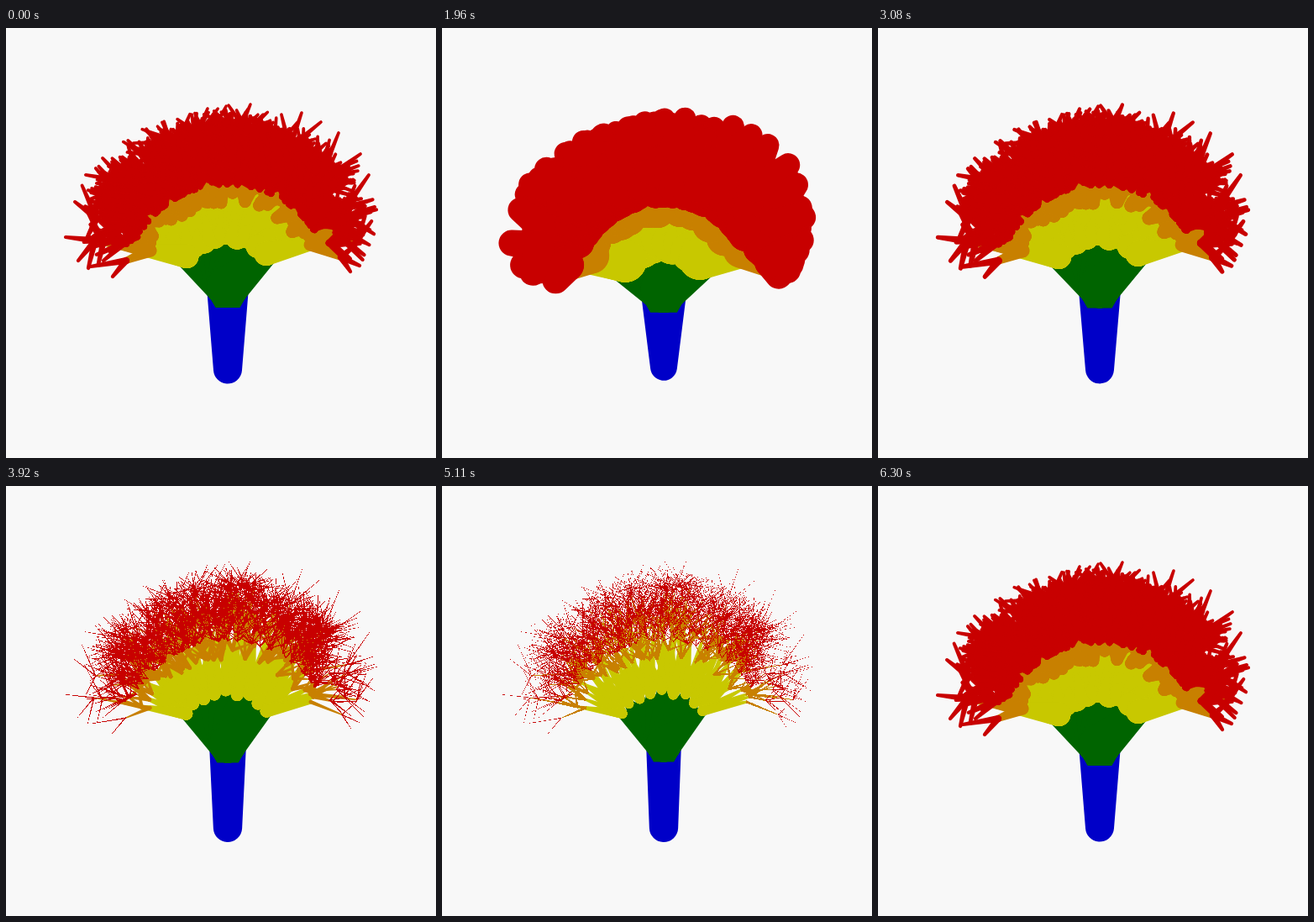
An HTML page with a canvas for the animation above (6370 ms loop, 512 px wide and 512 px high).

```html
<!DOCTYPE html>
<html lang="en">
<head>
<meta charset="utf-8">
<title>Branching tree</title>
<style>
  html, body { margin: 0; width: 100%; height: 100%; overflow: hidden; background: #f8f8f8; }
  canvas { display: block; width: 512px; height: 512px; }
</style>
</head>
<body>
<canvas id="stage" width="512" height="512"></canvas>
<script>
const ctx = document.getElementById('stage').getContext('2d');
const STEP = 70, STEPS = 91;
const COLORS = ['#0000c8', '#006400', '#c8c800', '#c88000', '#c80000'];
const FORK = { x: 264, y: 308 };
const PIVOT = { x: 264, y: 363 };

let seed = 20417;
function rnd() {
  seed = (seed * 1664525 + 1013904223) >>> 0;
  return seed / 4294967296;
}
const spread = deg => (rnd() + rnd() - 1) * deg;

// a: degrees away from straight up, r: distance from the fork
function polar(a, r) {
  const t = a * Math.PI / 180;
  return { x: FORK.x + r * Math.sin(t), y: FORK.y + 2 - r * Math.cos(t), a, r };
}

const levels = [[], [], [], [], []];
function grow(level, from, to) {
  levels[level].push({ from, to });
  return to;
}

// Radius of the crown, smaller towards the sides
const crown = a => 217 - 2 * Math.max(0, Math.abs(a) - 55);

function tipAt(node) {
  const a = Math.max(-80, Math.min(78, node.a + spread(17)));
  const r = Math.min(crown(a) - 26 * rnd(), node.r + 8 + 42 * rnd());
  return polar(a, r);
}

function orangeAt(node) {
  const a = node.a * 1.03 + spread(15);
  const r = Math.max(124, node.r + 4 + 46 * rnd());
  return polar(a, Math.min(r, crown(a) - 22));
}

function buildTree() {
  grow(0, { x: 264, y: 406.5 }, FORK);
  for (let i = 0; i < 9; i++) {
    const green = grow(1, FORK, polar(-52 + 100 * i / 8, 61 + 7 * rnd()));
    for (let j = 0; j < 8; j++) {
      const a = green.a * 0.95 + ((j + rnd()) / 8 * 2 - 1) * 17;
      const yellow = grow(2, green, polar(a, 102 + 46 * rnd() * Math.cos(a * Math.PI / 180)));
      for (let k = 0; k < 5; k++) {
        const orange = grow(3, yellow, orangeAt(yellow));
        for (let m = 0; m < 4; m++) grow(4, orange, tipAt(orange));
      }
    }
  }
  addRim();
  addSideBranches();
}

// Long tips that shape the outline
function addRim() {
  const rim = [[265, 92], [291, 91], [240, 96], [352, 101], [375, 112], [396, 125],
    [422, 150], [432, 175], [439, 213], [95, 175], [82, 207], [115, 155]];
  const nodes = levels[3].map(s => s.to);
  for (const [x, y] of rim) {
    const miss = n => Math.abs(Math.hypot(n.x - x, n.y - y) - 38);
    const near = nodes.reduce((p, q) => miss(q) < miss(p) ? q : p);
    grow(4, near, { x, y });
  }
}

// Low boughs on both sides: yellow end, orange end, tips
function addSideBranches() {
  const sides = [
    [[172, 265], [143, 277], [127, 296], [101, 284]],
    [[172, 265], [106, 253], [71, 249], [86, 277], [98, 286]],
    [[362, 258], [399, 273], [410, 290], [421, 283], [416, 258]]
  ];
  const pt = ([x, y]) => ({ x, y });
  for (const [yellow, orange, ...tips] of sides) {
    const left = yellow[0] < FORK.x;
    const start = levels[1][left ? 0 : 8].to;
    const y = grow(2, start, pt(yellow));
    const o = grow(3, y, pt(orange));
    for (const t of tips) grow(4, o, pt(t));
  }
}

function capsule(x0, y0, r0, x1, y1, r1) {
  const d = Math.hypot(x1 - x0, y1 - y0);
  ctx.beginPath();
  if (d <= Math.abs(r0 - r1)) {
    if (r0 > r1) ctx.arc(x0, y0, r0, 0, 2 * Math.PI);
    else ctx.arc(x1, y1, r1, 0, 2 * Math.PI);
  } else {
    const t = Math.atan2(y1 - y0, x1 - x0);
    const e = Math.acos((r0 - r1) / d);
    ctx.arc(x0, y0, r0, t + e, t - e + 2 * Math.PI);
    ctx.arc(x1, y1, r1, t - e, t + e);
    ctx.closePath();
  }
  ctx.fill();
}

// Hairlines only fill the pixels whose centre they cover
function hairline(x0, y0, r0, x1, y1, r1) {
  const dx = x1 - x0, dy = y1 - y0;
  const wide = Math.abs(dx) > Math.abs(dy);
  const n = Math.max(1, Math.ceil(Math.max(Math.abs(dx), Math.abs(dy))));
  const stretch = Math.hypot(dx, dy) / (Math.max(Math.abs(dx), Math.abs(dy)) || 1);
  const [m0, m1, c0, c1] = wide ? [x0, x1, y0, y1] : [y0, y1, x0, x1];
  for (let i = 0; i < n; i++) {
    const main = Math.floor(m0 + (m1 - m0) * i / n);
    const u = (main + 0.5 - m0) / ((m1 - m0) || 1);
    const c = c0 + (c1 - c0) * u;
    const half = (r0 + (r1 - r0) * u) * stretch;
    const lo = Math.ceil(c - half - 0.5), hi = Math.floor(c + half - 0.5);
    if (hi < lo) continue;
    if (wide) ctx.fillRect(main, lo, 1, hi - lo + 1);
    else ctx.fillRect(lo, main, hi - lo + 1, 1);
  }
}

function hexagon(x, y, r) {
  ctx.beginPath();
  for (let i = 0; i < 6; i++) {
    const t = i * Math.PI / 3;
    ctx.lineTo(x + r * 1.155 * Math.cos(t), y + r * Math.sin(t) * 1.155);
  }
  ctx.fill();
}

function draw(step) {
  const s = Math.sin(2 * Math.PI * step / 90);
  const ratio = 0.53 * Math.exp(0.643 * s - 0.135 * s * s);
  const top = 25 + 4.6 * s;
  const radii = [17, top];
  for (let i = 1; i < 5; i++) radii.push(top * ratio ** i);
  const zoom = 1 - 0.0045 * (radii[5] - 2);
  const sx = x => PIVOT.x + (x - PIVOT.x) * zoom;
  const sy = y => PIVOT.y + (y - PIVOT.y) * zoom;

  ctx.fillStyle = '#f8f8f8';
  ctx.fillRect(0, 0, 512, 512);
  levels.forEach((segments, level) => {
    ctx.fillStyle = COLORS[level];
    const size = (k, y) => radii[k] * zoom * (k > 1 ? 1 + (y - 200) / 1000 : 1);
    const line = radii[level] < 2 ? hairline : capsule;
    if (level === 1) hexagon(sx(FORK.x), sy(FORK.y), top * zoom);
    for (const { from, to } of segments) {
      line(sx(from.x), sy(from.y), size(level, from.y),
           sx(to.x), sy(to.y), size(level + 1, to.y));
    }
  });
}

buildTree();
const start = performance.now();
let shown = -1;
function tick() {
  const step = Math.floor((performance.now() - start) / STEP) % STEPS;
  if (step !== shown) draw(shown = step);
  requestAnimationFrame(tick);
}
tick();
</script>
</body>
</html>
```
